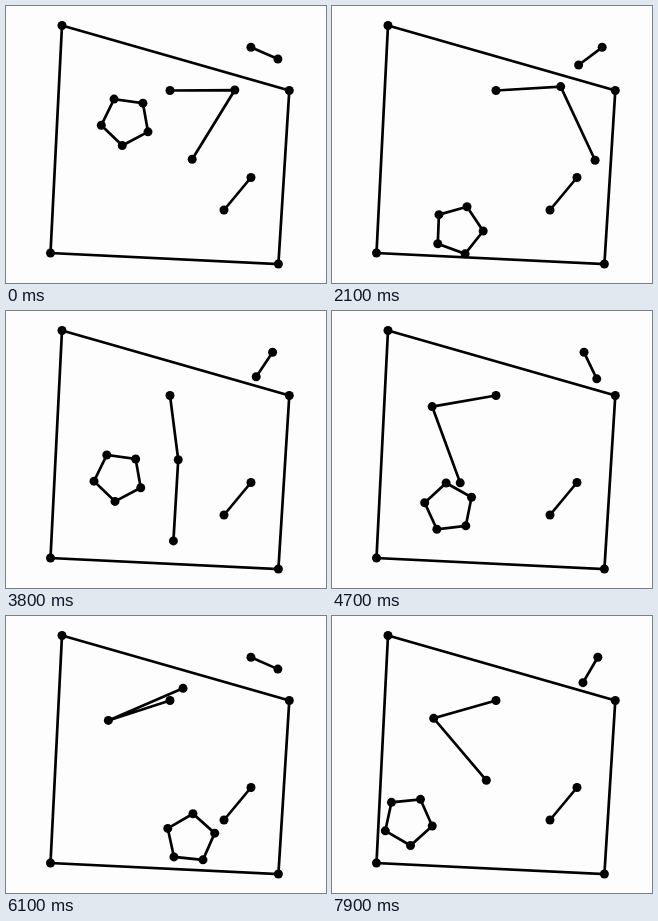
These frames come from a looping animation (320 by 277 pixels, 8 s). An HTML page with a canvas:

```html
<!DOCTYPE html>
<html lang="en">
<head>
<meta charset="utf-8">
<title>Sticks and joints</title>
<style>
  html, body { margin: 0; width: 100%; height: 100%; overflow: hidden; background: #fefdfe; }
  canvas { display: block; }
</style>
</head>
<body>
<canvas width="320" height="277"></canvas>
<script>
const ctx = document.querySelector('canvas').getContext('2d');
const LOOP = 8000, STEP = 100;
const GRAVITY = 125; // px/s²
const RAD = Math.PI / 180;

const FRAME = [[56, 19.5], [283.3, 84.5], [272.4, 258], [44.5, 247]];
const STICK = [[245, 171.5], [218, 204]];
const PIVOT = [164, 84.5];

// Turning points of the two arms: time, degrees from straight down
const UPPER = [[0, 90.4], [1.4, 27.5], [2.4, 110.6], [5.2, -96], [5.8, -92], [7, 44], [8, -77]];
const LOWER = [[0, -31.6], [.5, -40], [1.7, 42.4], [2.9, -27], [4.7, 20.2], [5.7, 119], [8, 40]];

// Knocks of the pentagon: time, centre x, centre y, rotation
const KNOCKS = [
  [0, 119.7, 115, 26], [1.1, 133.5, 226, 1.5], [2.1, 126.4, 224, 2.3], [4.34, 108, 223, 33.5],
  [4.7, 117, 196.6, 47.3], [6.05, 188.5, 227, 61], [7.5, 72, 221, 24], [7.9, 76, 204.8, 12.2]
];

// Neighbouring keys around t, and how far t lies between them
function around(keys, t) {
  let i = 0;
  while (i < keys.length - 2 && t >= keys[i + 1][0]) i++;
  const a = keys[i], b = keys[i + 1];
  return [a, b, (t - a[0]) / (b[0] - a[0])];
}

// Cosine ease from one turning point to the next
function swing(turns, t) {
  const [a, b, u] = around(turns, t);
  return a[1] + (b[1] - a[1]) * (1 - Math.cos(Math.PI * u)) / 2;
}

// Free fall from one knock to the next
function flight(t) {
  const [a, b, u] = around(KNOCKS, t);
  const [, x, y, turn] = a.map((p, k) => p + (b[k] - p) * u);
  return [x, y - GRAVITY / 2 * (t - a[0]) * (b[0] - t), turn];
}

const hang = ([x, y], length, angle) =>
  [x + length * Math.sin(angle * RAD), y + length * Math.cos(angle * RAD)];

function chain(points, closed) {
  ctx.beginPath();
  points.forEach(p => ctx.lineTo(...p));
  if (closed) ctx.closePath();
  ctx.stroke();
  for (const [x, y] of points) {
    ctx.beginPath();
    ctx.arc(x, y, 4.5, 0, 2 * Math.PI);
    ctx.fill();
  }
}

function pendulum(t) {
  const elbow = hang(PIVOT, 64.8, swing(UPPER, t));
  chain([PIVOT, elbow, hang(elbow, 81.3, swing(LOWER, t))]);
}

// Its top end slides sideways while the middle only moves up and down
function slider(t) {
  const phase = 21.5 + 57.6 * t - 9.5 * Math.exp(-t);
  const tilt = 68 * Math.cos(phase * RAD);
  const top = [258.4 - 14.7 * Math.sin(tilt * RAD), 41.3];
  chain([top, hang(top, 29.4, tilt)]);
}

function pentagon(t) {
  const [x, y, turn] = flight(t);
  chain([0, 1, 2, 3, 4].map(k => hang([x, y], 24.8, 90 - turn - 72 * k)), true);
}

function draw(t) {
  ctx.fillStyle = '#fefdfe';
  ctx.fillRect(0, 0, 320, 277);
  ctx.fillStyle = ctx.strokeStyle = '#000';
  ctx.lineWidth = 2.7;
  chain(FRAME, true);
  chain(STICK);
  pendulum(t);
  slider(t);
  pentagon(t);
}

function tick() {
  const ms = performance.now() % LOOP;
  draw(Math.floor(ms / STEP) * STEP / 1000);
  requestAnimationFrame(tick);
}
tick();
</script>
</body>
</html>
```
